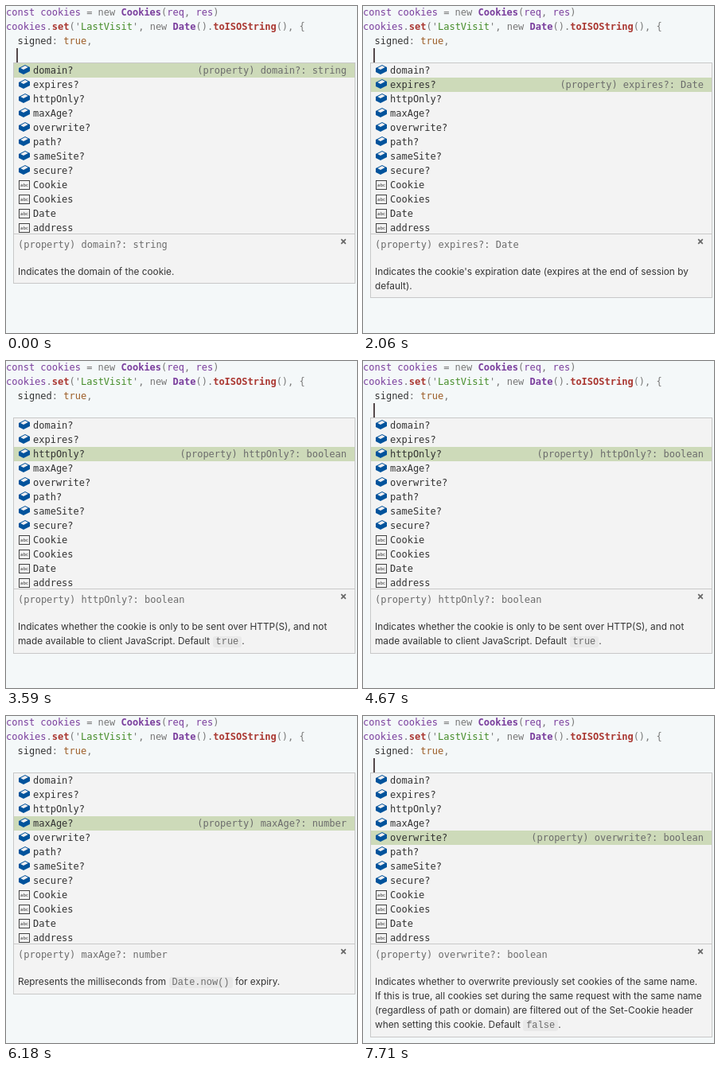
Write an HTML page that moves like this. It is 441 px wide and 411 px high and loops after 8 s.

```html
<!DOCTYPE html>
<html lang="en">
<head>
<meta charset="utf-8">
<style>
  html, body { margin: 0; width: 100%; height: 100%; overflow: hidden; background: #f4f8f9; }
  body { position: relative; font: 12px/18px "DejaVu Sans Mono", monospace; color: #333; white-space: pre; }
  #code { position: absolute; left: 0; top: -1px; color: #777; }
  #code b { color: #aa3731; }
  #code .name { color: #7a3e9d; }
  #code .str { color: #448c27; }
  #code .const { color: #9c5d27; }
  #cursor { position: absolute; left: 13px; top: 53px; width: 2px; height: 18px; background: #54494b; }
  #popup { position: absolute; left: 9px; top: 71px; width: 430px; box-sizing: border-box;
    border: 1px solid #c8c8c8; background: #f3f3f3; }
  #list { height: 214px; overflow: hidden; }
  .row { position: relative; height: 18px; padding-left: 24px; }
  .row svg { position: absolute; left: 5px; top: 1px; }
  .row span { position: absolute; right: 10px; top: 0; color: #6c6c6c; display: none; }
  .row.on { background: #cddab9; }
  .row.on span { display: block; }
  #type { position: absolute; left: 5px; top: 219px; color: #6c6c6c; }
  #close { position: absolute; left: 410px; top: 220px; }
  #details { position: absolute; left: 0; right: 0; top: 214px; border-top: 1px solid #c8c8c8; }
  #doc { position: absolute; left: 5px; top: 253px; font: 11.85px/18px Inter, sans-serif; }
  #doc code { font: 12px/0 "Liberation Mono", monospace; color: #6c6c6c; padding: 0 4px;
    border-radius: 3px; background: rgba(220, 220, 220, .45); }
</style>
</head>
<body><div id="code"><span class="name">const cookies</span> = new <b class="name">Cookies</b>(<span class="name">req</span>, <span class="name">res</span>)
<span class="name">cookies</span>.<b>set</b>('<span class="str">LastVisit</span>', new <b class="name">Date</b>().<b>toISOString</b>(), {
  <span style="color:#333">signed</span>: <span class="const">true</span>,</div><div id="cursor"></div><div id="popup"><div id="list"></div><div id="details"></div><div id="type"></div><svg id="close" width="8" height="8"><path d="M1.2 1.2L6.8 6.8M6.8 1.2L1.2 6.8" stroke="#666" stroke-width="1.7"/></svg><div id="doc"></div></div>
<script>
const LOOP = 8000;
const $ = id => document.getElementById(id);

// Each step: start time, item, its type, popup height, documentation.
const steps = [
  [0, 'domain?', 'string', 278, 'Indicates the domain of the cookie.'],
  [2060, 'expires?', 'Date', 296,
    "Indicates the cookie's expiration date (expires at the end of session by\ndefault)."],
  [3590, 'httpOnly?', 'boolean', 297,
    'Indicates whether the cookie is only to be sent over HTTP(S), and not\n' +
    'made available to client JavaScript. Default <code>true</code>.'],
  [5020, 'maxAge?', 'number', 279,
    'Represents the milliseconds from <code>Date.now()</code> for expiry.'],
  [6540, 'overwrite?', 'boolean', 333,
    'Indicates whether to overwrite previously set cookies of the same name.\n' +
    'If this is true, all cookies set during the same request with the same name\n' +
    '(regardless of path or domain) are filtered out of the Set-Cookie header\n' +
    'when setting this cookie. Default <code>false</code>.'],
];
const signature = ([, name, type]) => `(property) ${name}: ${type}`;

// The cursor is visible at first and toggles at these times.
const blinks = [180, 710, 1160, 1700, 2240, 2690, 3230, 3680, 4220,
  4670, 5200, 5640, 6180, 6720, 7170, 7710];

const icon = body => `<svg width="16" height="16">${body}</svg>`;
const cube = icon('<path fill="#00539c" d="M9 1L1 5v5l6 3 8-4V4z"/>' +
  '<path fill="#f0eff1" d="M9 2.118L3.236 5 7 6.882 12.764 4z"/>');
const word = icon('<rect x="1.5" y="2.5" width="13" height="11" fill="none" stroke="#424242"/>' +
  '<text x="8" y="10.2" text-anchor="middle" font-family="DejaVu Sans, sans-serif" font-size="5.5" fill="#333">abc</text>');

const names = [...steps.map(s => s[1]), 'path?', 'sameSite?', 'secure?',
  'Cookie', 'Cookies', 'Date', 'address'];
$('list').innerHTML = names.map((name, i) =>
  `<div class="row">${name.endsWith('?') ? cube : word}${name}` +
  `${steps[i] ? `<span>${signature(steps[i])}</span>` : ''}</div>`).join('');
const rows = [...$('list').children];

let shown = -1;
function select(index) {
  if (index === shown) return;
  shown = index;
  const step = steps[index];
  rows.forEach((row, i) => row.classList.toggle('on', i === index));
  $('type').textContent = signature(step);
  $('popup').style.height = step[3] + 'px';
  $('doc').innerHTML = step[4];
}

function draw(now) {
  const t = now % LOOP;
  select(steps.filter(s => s[0] <= t).length - 1);
  const toggles = blinks.filter(b => b <= t).length;
  $('cursor').style.visibility = toggles % 2 ? 'hidden' : 'visible';
}

const start = performance.now();
function tick() {
  draw(performance.now() - start);
  requestAnimationFrame(tick);
}
tick();
</script>
</body>
</html>
```
